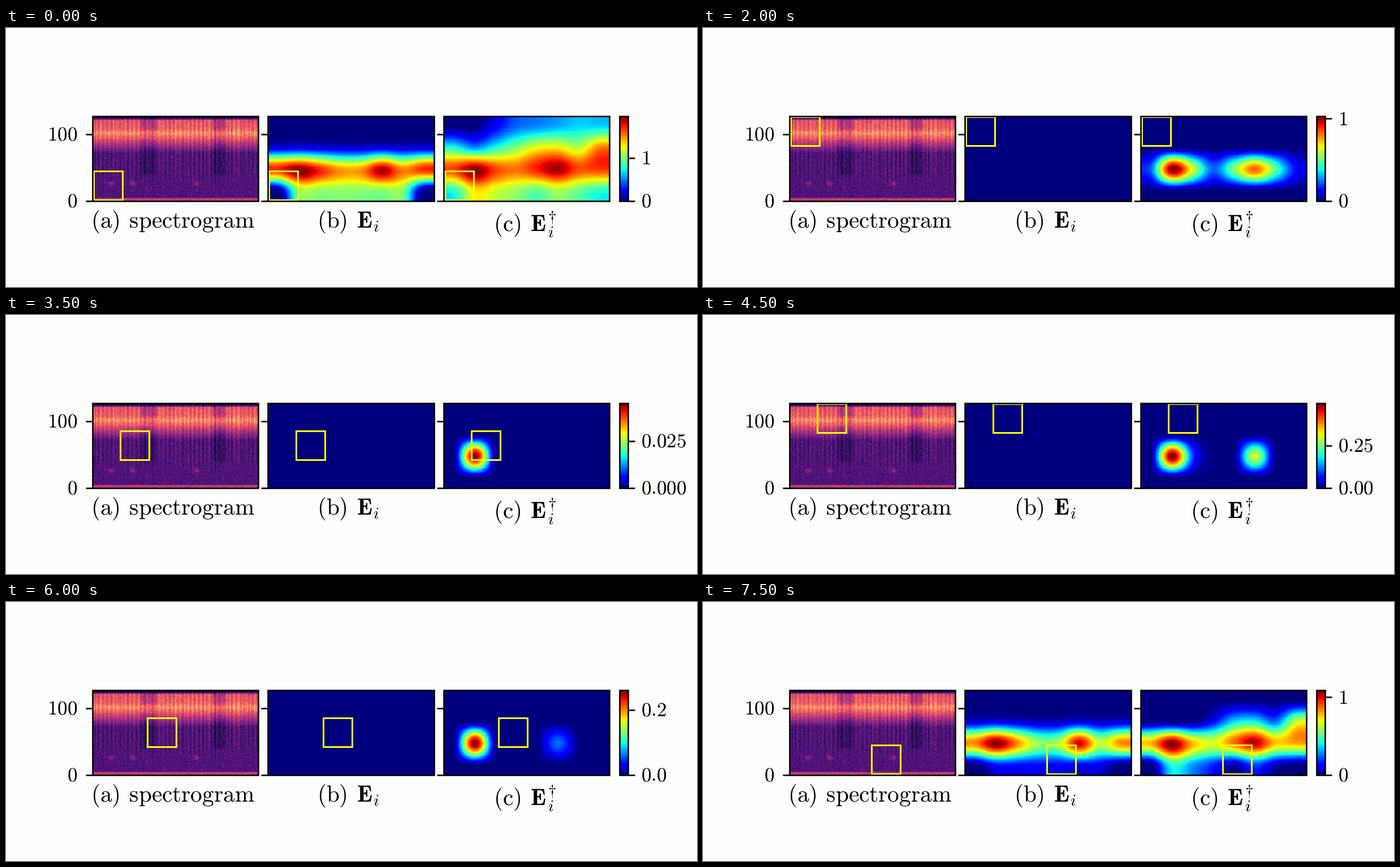
Recreate the animation shown at these times as a matplotlib script. Size 1222 by 458 pixels, loop 8 s.

```python
import numpy as np
import matplotlib.pyplot as plt
from matplotlib.animation import FuncAnimation
from matplotlib.patches import Rectangle

plt.rcParams.update({"mathtext.fontset": "cm", "text.hinting": "none"})

W, H, DPI = 1222, 458, 100
TOP, BOTTOM, WIDTH = 156, 306, 293.4
LEFTS = [153 + 310.45 * k for k in range(3)]
BAR = (1085, 1100)
COLS, BINS = 250, 128
ROWS = 5            # window positions per column
FULL = 1.97         # peak of the maps when nothing is cut away
LINE = 2.6 * 72 / DPI
TEXT = 41.3

# Peak of both maps for each window position, column by column
PEAKS = [1.97, 1.01, 0.625, 1.03, 1.03,
         1.92, 1.03, 0.045, 0.53, 0.497,
         2.07, 0.52, 0.26, 1.03, 1.03,
         1.09]

k = np.arange(8)    # coarse map columns


def bump(center, width):
    return np.exp(-((k - center) / width) ** 2)


CREST_B = 0.72 + 0.28 * bump(1, 1.3) + 0.24 * bump(5, 0.7) + 0.15 * bump(7, 0.7)
FLOOR_B = np.interp(k, [0, 1, 6, 7], [0, 0.53, 0.51, 0])
MAP_C = np.array([
    np.interp(k, [0, 1, 4, 5, 7], [0.4, 0.67, 0.47, 0.56, 0.4]),
    0.78 + 0.22 * bump(1, 0.9) + 0.2 * bump(4.8, 1) + 0.07 * bump(7, 0.7),
    np.interp(k, [0, 1, 4.5, 6, 7], [0.4, 0.28, 0.7, 0.58, 0.78]),
    np.interp(k, [1, 3, 6], [0, 0.23, 0.34])])
BLOB_DROP = np.interp(k, [0, 1, 3, 5, 7], [0.8, 0, 0.8, 0.2, 0.9])


def cubic_matrix(n, size):
    """Weights of a cubic upsampling from n cells to size samples."""
    u = (np.arange(size) + 0.5) * n / size - 0.5
    out = np.zeros((size, n))
    base = np.floor(u).astype(int)
    for j in range(-1, 3):
        d = abs(u - base - j)
        w = np.where(d < 1, 1.5 * d**3 - 2.5 * d**2 + 1, -0.5 * d**3 + 2.5 * d**2 - 4 * d + 2)
        np.add.at(out, (np.arange(size), np.clip(base + j, 0, n - 1)), w)
    return out


UP_Y, UP_X = cubic_matrix(4, BINS), cubic_matrix(8, COLS)


def upsample(cells):
    return UP_Y @ cells @ UP_X.T


def lower(cells, peak):
    """Shift the cells so that the highest one equals peak; empty cells stay empty."""
    return np.where(cells > 0, np.maximum(FULL * cells + peak - FULL, 0), 0)


def maps(row, peak):
    b, c = np.zeros((2, 4, 8))
    if row < 2:
        crest = lower(CREST_B, peak)
        b[:3] = lower(FLOOR_B, peak), crest, 0.11 * crest
        c = lower(MAP_C, peak)
    else:
        c[1] = np.maximum(peak - BLOB_DROP, 0)
    return upsample(b), upsample(c)


def spectrogram():
    rng = np.random.default_rng(4)
    y, x = np.mgrid[0:BINS, 0:COLS]
    level = np.interp(y, [0, 3, 5, 72, 82, 96, 102, 108, 121, 125],
                      [0.58, 0.5, 0.25, 0.25, 0.42, 0.67, 0.77, 0.66, 0.62, 0.12])
    stripe = np.cos(2 * np.pi * x / 6.25) + 0.6 * rng.normal(size=COLS)
    level += stripe * np.interp(y, [0, 30, 45, 123, 126], [0, 0.015, 0.045, 0.055, 0])
    gap = (abs(x - 84) < 13) | (abs(x - 190.5) < 10.5)
    dim = np.interp(y, [36, 42, 76, 97, 105, 110], [1, 0.75, 0.75, 0.92, 0.9, 0.79])
    level = np.where(gap, level * dim, level)
    for cx in (28, 60, 156):
        level += 0.16 * np.exp(-((x - cx) / 4) ** 2 - ((y - 26) / 3.5) ** 2)
    return level + rng.normal(0, 0.045, level.shape)


fig = plt.figure(figsize=(W / DPI, H / DPI), dpi=DPI, facecolor="#fdfdfb")
ax = fig.add_axes([0, 0, 1, 1])


def image(data, left, right, cmap):
    return ax.imshow(data, extent=(left, right, BOTTOM, TOP), origin="lower", cmap=cmap,
                     vmin=0, vmax=1, aspect="auto", interpolation="nearest")


def frame(left, right):
    ax.add_patch(Rectangle((left, TOP), right - left, BOTTOM - TOP, fill=False,
                           lw=LINE, ec="black", zorder=5))


def tick(x, y):
    return ax.plot([x, x + 12], [y, y], color="black", lw=LINE, solid_capstyle="butt", zorder=5)[0]


def label(x, y, text, px=TEXT, **kw):
    return ax.text(x, y, f"${text}$", fontsize=px * 72 / DPI, **kw)


def number(x, y, text, ha):
    return label(x, y + 11.5, rf"\mathrm{{{text}}}", 35.2, ha=ha, va="baseline")


def caption(x, y, letter, text):
    label(x, y, rf"\mathrm{{({letter})}}\hspace{{0.42}}{text}")


zero = np.zeros((BINS, COLS))
image(spectrogram(), LEFTS[0], LEFTS[0] + WIDTH, "magma")
img_b, img_c = [image(zero, x, x + WIDTH, "jet") for x in LEFTS[1:]]
image(np.linspace(0, 1, 256)[:, None], *BAR, "jet")

boxes = []
for left in LEFTS:
    frame(left, left + WIDTH)
    for y in (188, BOTTOM):
        tick(left - 12, y)
    box = Rectangle((0, 0), 51, 50.5, fill=False, ec="#ffff00", lw=3 * 72 / DPI, zorder=4)
    boxes.append(ax.add_patch(box))
frame(*BAR)

number(126.5, 188, "100", "right")
number(126.5, BOTTOM, "0", "right")
caption(149.5, 354, "a", r"\mathrm{spectrogram}")
caption(550.5, 354, "b", r"\mathbf{E}_i")
caption(862, 360, "c", r"\mathbf{E}")
label(957.5, 343, r"\dagger", 0.7 * TEXT)
label(957.5, 370, "i", 0.7 * TEXT)

tick(BAR[1], BOTTOM)
high_tick = tick(BAR[1], TOP)
low_num = number(1123, BOTTOM, "0", "left")
high_num = number(1123, TOP, "1", "left")

ax.set_xlim(0, W)
ax.set_ylim(H, 0)
ax.axis("off")


def update(i):
    peak = PEAKS[i]
    col, row = divmod(i, ROWS)
    for img, data in zip((img_b, img_c), maps(row, peak)):
        img.set_data(data)
        img.set_clim(0, peak)
    for box, left in zip(boxes, LEFTS):
        box.set_xy((left + 1.6 + 47.8 * col, 253 - 23.9 * row))

    # Smallest round step that leaves a single tick above zero
    step = next(s for s in (0.025, 0.2, 0.25, 0.5, 1, 2) if s >= peak / 2)
    text = f"{step:g}"
    digits = len(text.partition(".")[2])
    y = BOTTOM - (BOTTOM - TOP) * step / peak
    high_tick.set_ydata([y, y])
    high_num.set_y(y + 11.5)
    high_num.set_text(rf"$\mathrm{{{text}}}$")
    low_num.set_text(rf"$\mathrm{{{0:.{digits}f}}}$")
    return []


anim = FuncAnimation(fig, update, frames=len(PEAKS), interval=500, repeat=True, repeat_delay=0,
                     init_func=lambda: [], blit=False)
plt.show()
```
